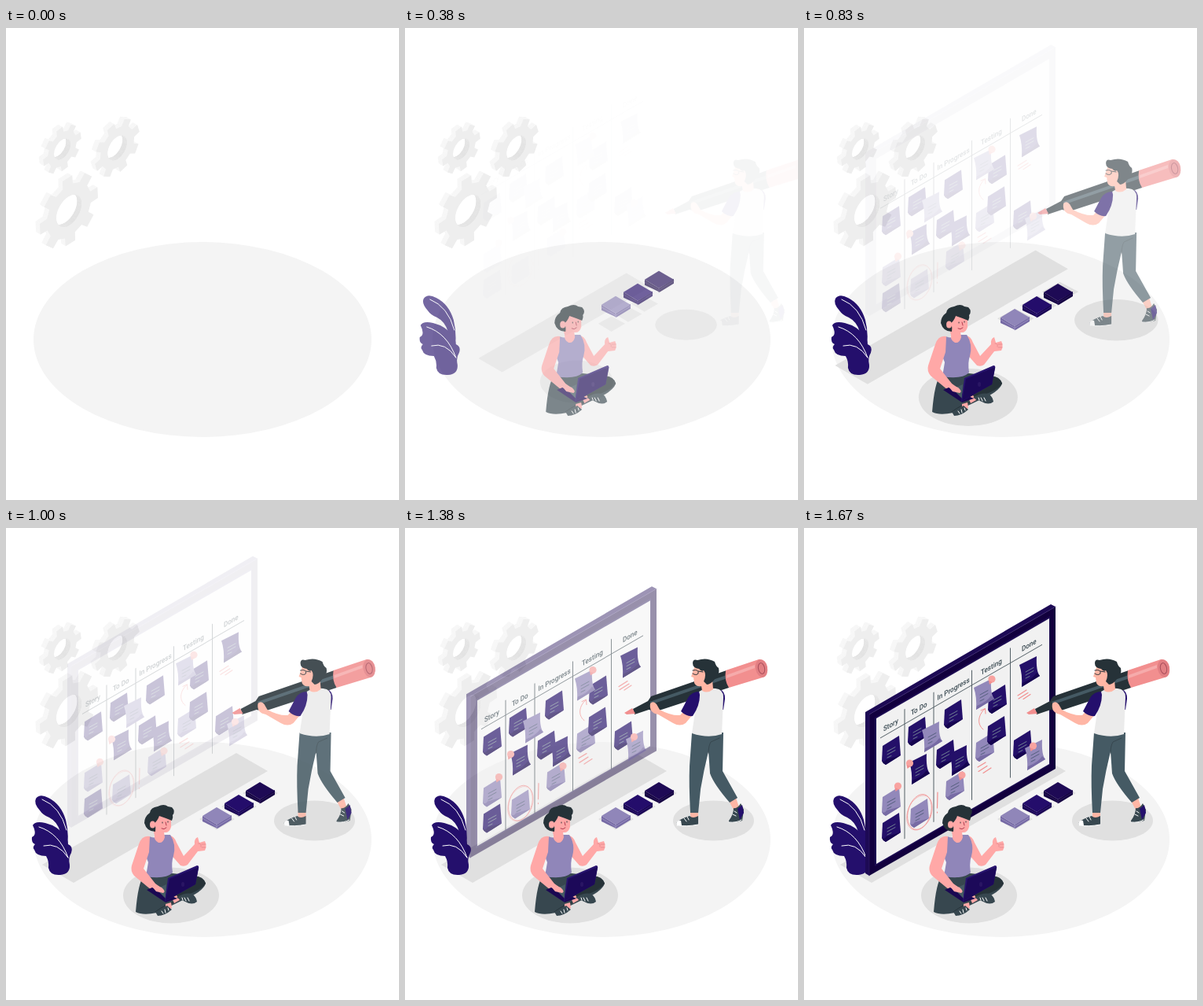
These frames come from a looping animation (500 by 600 pixels, 1710 ms). An HTML page:

```html
<!DOCTYPE html>
<html lang="en">
<head>
<meta charset="utf-8">
<title>Planning board</title>
<style>
html, body { margin: 0; height: 100%; overflow: hidden; background: #fff }
svg { display: block; width: 100vw; height: 100vh }
text { font: 500 9.3px Roboto, sans-serif; fill: #37474f }
.line { fill: none; stroke-linecap: round; stroke-linejoin: round }
</style>
</head>
<body>
<svg viewBox="0 0 500 600">
  <ellipse cx="250" cy="396" rx="215" ry="124" fill="#f4f4f4"/>
  <g id="gears"></g>

  <g id="shadows" fill="#e0e0e0">
    <path d="M293 286L333 309L86 451L46 428Z"/>
    <ellipse cx="210" cy="467" rx="61" ry="35.500"/>
    <ellipse cx="392.5" cy="372" rx="51.5" ry="25.5"/>
    <path d="M268 358L291 370L268 383.500L246 370ZM296 342L319 354L296 367.500L274 354ZM323 325L346 337L323 350.500L301 337Z"/>
  </g>

  <g id="plant" fill="#240f6c">
    <path d="M77 415Q81 390 76 371Q70 351 54 343Q43 337 38 344Q35 350 43 359Q47 365 55 368Q65 373 69 386Q72 392 77 415Z"/>
    <path d="M34 378Q37 372 50 375Q66 379 75 391Q79 397 79 402Q86 405 83 413Q79 419 81 428Q82 440 69 441Q56 442 54 432Q55 424 51 417Q38 417 36 409Q33 406 37 402Q32 400 33 393Q40 390 34 378Z"/>
    <path class="line" stroke="#fff" d="M46 345Q69 354 77 384M42 380Q68 388 79 419M48 404Q66 399 79 419"/>
  </g>

  <g id="board">
    <path fill="#1d0a55" d="M78 234L314 97L320 100L83 237V442L78 439Z"/>
    <path fill="#12003e" d="M83 237L320 100V306L83 442Z"/>
    <path fill="#1c0b52" d="M90 241L313 112V301L90 430Z"/>
    <path class="line" stroke="#36236f" stroke-width=".6" d="M83 442V237L320 100"/>
    <path fill="#f1f1f1" d="M92 242L312 115V300L92 427Z"/>
  </g>

  <g id="content">
    <g id="columns" transform="matrix(1 -.577 0 1 0 323)" stroke="#546067">
      <path d="M97 0H303M128 -19V146M165 -19V146M213.500 -19V146M262.500 -19V146"/>
    </g>
    <g id="notes"></g>
    <g class="line" stroke="#f28f8f">
      <path d="M272 213L283 206M273 217L285 209.500M279 217.500L288 211.500M221 304L231 298M222 309.500L233 302.500M228 311.500L238 305" stroke-width="1.200"/>
      <path d="M228 256C220 250 221 238 230 230M225 232L230.500 229.500L231 236"/>
      <path d="M170 336L169.500 356M169.500 361V362" stroke-width="1.200"/>
      <ellipse cx="147" cy="361" rx="14.500" ry="23" transform="rotate(17 147 361)" stroke-width=".8"/>
      <ellipse cx="147" cy="362" rx="15" ry="23" transform="rotate(22 147 362)" stroke-width=".5"/>
    </g>
  </g>

  <g id="boxes"></g>

  <g id="woman">
    <path fill="#37474f" d="M176 441Q168 450 165 488Q174 493 192 489L225 473Q250 463 254 452Q252 443 239 442L212 439Z"/>
    <path fill="#263238" d="M212 471Q246 464 254 452Q251 442 234 442L206 452Z"/>
    <path class="line" stroke="#263238" d="M190 488Q203 478 216 475"/>
    <path fill="#ffa8a7" d="M211 470L217 467L221 473L214 477ZM203 478L210 476L211 483L203 487Z"/>
    <path fill="#37474f" d="M217 470Q227 463 237 465Q242 469 243 475Q237 480 228 475ZM190 488L205 480L211 485Q202 493 193 493Z"/>
    <path class="line" stroke="#fff" d="M225 473L224 470M229 474L227 470M233 474L231 470M198 487L200 490M202 485L203 489M206 483L207 486"/>
    <path fill="#ffa8a7" d="M207 391Q214 391 217 400L226 417L240 402Q239 395 244 393L246 400L253 398Q256 404 253 410L244 411L231 428Q227 431 222 429L207 412Z"/>
    <path class="line" stroke="#e98d92" d="M245 401Q249 401 248 405M249 402H254M249 406H254"/>
    <path fill="#9086b9" d="M182 392Q192 396 202 390L209 390Q217 402 213 417Q210 425 212 438Q203 447 178 443L181 425Q176 415 178 399Z"/>
    <path fill="#ffa8a7" d="M183 392Q173 390 169 402L160 429Q158 436 163 442L186 461L198 465Q204 463 197 457L190 452L175 433L182 412Z"/>
    <path fill="#ffa8a7" d="M190 365Q202 360 210 367L210 380Q208 388 201 387L202 393Q200 401 194 400Q188 397 189 391L187 382Q182 381 184 375Z"/>
    <path fill="#263238" d="M190 386Q191 378 188 376Q193 372 195 366Q204 369 211 372Q213 368 212 365Q216 360 211 355L206 354Q201 350 193 354Q184 355 183 362Q176 367 176 375Q179 386 190 386Z"/>
    <ellipse cx="186.500" cy="377" rx="3.500" ry="4.500" fill="#ffa8a7"/>
    <path class="line" stroke="#263238" d="M199 374V375M206 373V374"/>
    <path class="line" stroke="#b23c50" d="M198 382Q201 384 204 381M203 374L204 378"/>
    <path fill="#1a0752" d="M179 460L186 457L218 471L203 476Z"/>
    <path fill="#455a64" d="M191 459L204 453L203 471Z"/>
    <path fill="#28146f" d="M206 445L243 429Q246 429 245 433L241 453L202 475Z"/>
    <path fill="#1c0959" d="M208 446L245 431L241 453L203 474Z"/>
    <ellipse cx="225" cy="453" rx="2" ry="3" fill="#2a1664"/>
    <path fill="#ffa8a7" d="M181 450L198 457Q204 462 200 464L191 462Z"/>
  </g>

  <g id="man">
    <path fill="#ffb6a5" d="M367 359H377V371H367ZM416 347L425 343L429 355L422 358Z"/>
    <path fill="#37474f" d="M349 375Q353 370 366 366Q370 370 377 366L377 377Q365 380 350 378ZM416 372Q422 364 422 356Q427 357 431 350L435 358L433 372Q424 375 416 374Z"/>
    <path fill="#240f6c" d="M427 357L433 352L435 362L430 371Z"/>
    <path class="line" stroke="#fff" d="M350 378Q362 380 377 377M359 369L362 373M363 367L365 371M416 374Q426 375 432 371M421 364L425 366M423 360L426 362"/>
    <path fill="#fff" d="M349 376Q350 371 355 372L356 378H350Z"/>
    <path fill="#455a64" d="M369 260H409L408 309L427 343L417 349Q397 326 392 312L390 284Q384 308 380 332L377 362H367Q365 326 366 302Z"/>
    <path class="line" stroke="#37474f" d="M390 286Q390 277 393 272L404 267"/>
    <path fill="#240f6c" d="M404 205Q411 207 411 217L409 231H404Z"/>
    <path fill="#263238" d="M294 230L313 220L317 214L413 181L416 203L324 233L314 231L296 237Z"/>
    <path fill="#455a64" d="M315 221L413 187L414 191L318 224Z"/>
    <path fill="#f28f8f" d="M283 235L293 229L297 236L286 237ZM412 181L454 167Q463 166 465 177Q466 187 459 190L416 203Q410 194 412 181Z"/>
    <path fill="#f6abab" d="M413 187L449 174V178L413 191Z"/>
    <ellipse cx="457.500" cy="178.500" rx="7.500" ry="11.500" fill="#e27f83" transform="rotate(-12 457.500 178.500)"/>
    <ellipse cx="457.500" cy="178.500" rx="4" ry="7" fill="none" stroke="#a94f5c" transform="rotate(-12 457.500 178.500)"/>
    <path fill="#ebebeb" d="M378 208Q386 203 399 204Q409 205 409 215L407 262Q390 268 369 261L373 234Z"/>
    <path fill="#ffb6a5" d="M372 177L383 176L394 182L396 205Q389 211 382 207L381 201Q374 202 372 197L371 190L368 189Z"/>
    <path fill="#263238" d="M370 172Q370 166 376 168Q388 164 398 170Q399 175 403 178Q405 186 398 192Q393 199 388 199L384 195Q388 186 384 181Q381 183 378 179Q370 178 370 172Z"/>
    <ellipse cx="381.500" cy="187" rx="3.500" ry="4.500" fill="#ffb6a5"/>
    <path class="line" stroke="#263238" d="M383 183L377 182M370 181Q378 179 377 185Q374 188 370 185"/>
    <path fill="#ffb6a5" d="M316 223Q320 219 324 224L328 231Q343 239 354 238L362 229L371 236L361 248Q354 253 345 248L326 237Q314 235 316 223Z"/>
    <path fill="#240f6c" d="M378 208Q369 208 364 216L355 233Q362 240 370 239Q379 226 379 212Z"/>
  </g>
</svg>
<script>
const LOOP = 1710, STEP = 1000 / 24, START_HOLD = 130;
const $ = id => document.getElementById(id);
const put = (id, markup) => $(id).insertAdjacentHTML('beforeend', markup);
const path = (d, fill, extra = '') => `<path d="${d}" fill="${fill}" ${extra}/>`;

// Gears: upright isometric discs, extruded towards the upper left
function gear(cx, cy, radius, phase) {
  const at = (r, deg) => {
    const a = deg * Math.PI / 180;
    return (r * Math.cos(a)).toFixed(1) + ' ' + (r * Math.sin(a)).toFixed(1);
  };
  const ring = r => `M${-r} 0A${r} ${r} 0 1 0 ${r} 0A${r} ${r} 0 1 0 ${-r} 0Z`;
  const root = radius * .76, hole = radius * .43;
  const outline = [];
  for (let i = 0; i < 8; i++) {
    const a = phase + i * 45;
    outline.push(at(root, a - 13), at(radius, a - 9.5), at(radius, a + 9.5), at(root, a + 13));
  }
  const body = `M${outline.join('L')}Z` + ring(hole);
  const layer = (k, d, fill) =>
    path(d, fill, `fill-rule="evenodd" transform="matrix(.866 -.5 0 1 ${cx + k} ${cy + k * .577})"`);
  let out = '';
  for (let k = -3; k < 2.5; k += .5) {
    out += layer(k, body, '#f7f7f7') + layer(k, ring(hole) + ring(hole + 2), '#dedede');
  }
  return out + layer(2.5, body, '#eeeeee');
}
put('gears', gear(69, 152.5, 28, -8) + gear(139, 151, 33, -17) + gear(77.5, 231, 43, -3));

[['Story', 101], ['To Do', 136], ['In Progress', 169.5], ['Testing', 225], ['Done', 277]].forEach(([label, x]) =>
  put('columns', `<text stroke="none" transform="translate(${x} -6) scale(.866 1)">${label}</text>`));

// Notes: x, y, dark, curl on the right
const DARK = ['#241069', '#160550', '#6f7f92'], LIGHT = ['#9288ba', '#776ba4', '#56607f'];
function note([x, y, dark, right]) {
  const [face, fold, ink] = dark ? DARK : LIGHT;
  const shape = right
    ? path('M-13 -8L9 -19Q8 0 13 6L-10 20Q-9 3 -13 -8Z', face) + path('M13 6L-10 20L-9 15Q4 10 9 2Z', fold)
    : path('M-11 -6L10 -19L12 6L-7 18Q-11 16 -12 13Z', face) + path('M12 6L-7 18Q-11 16 -12 13Q-8 15 -6 11Z', fold);
  return `<g transform="translate(${x} ${y})">${shape}
    <path class="line" stroke="${ink}" d="M-5 1L5 -4.500M-5 5L5 -.500M-5 9L0 6.500"/></g>`;
}
const notes = [
  [111, 283, 1, 0], [111, 348, 0, 0], [111, 381, 1, 0], [144, 259, 1, 0], [163, 265, 0, 1], [147, 306, 1, 1],
  [147, 363, 0, 0], [190, 237, 1, 0], [180, 288, 1, 0], [198, 295, 1, 1], [192, 328, 0, 0], [246, 218, 1, 0],
  [229, 211, 0, 1], [230, 279, 0, 0], [245, 258, 1, 0], [287, 182, 1, 1], [278, 276, 1, 0], [294, 288, 0, 1]
];
const pins = [[119.5, 328], [134.5, 299], [201, 314], [239, 192], [291.5, 277]];
put('notes', notes.map(note).join('') + pins.map(([x, y]) =>
  `<circle cx="${x}" cy="${y}" r="4.6" fill="#f8a3a0"/><path fill="#f28f8f" d="M${x - 4} ${y + 2}l1 5l4 -3z"/>`).join(''));

// Stacks of cards
const stack = (x, y, top, side, edge) => `<g transform="translate(${x} ${y})">
  ${path('M-18 -2L0 9L19 -3V3L1 14L-18 5Z', side)}${path('M-18 -2L0 -13L19 -2L0 9Z', top)}
  <path class="line" stroke="${edge}" stroke-width=".7" d="M-18 1L0 11.500L19 0M0 9V14"/></g>`;
put('boxes', stack(268, 368, '#9086b9', '#766aa5', '#a49bc8')
  + stack(296, 352, '#240d6b', '#1a0654', '#3b2880')
  + stack(323, 336, '#1e0a55', '#150442', '#372568'));

// Ease with a soft overshoot: cubic-bezier(.36, -.01, .5, 1.38)
function ease(x) {
  if (x >= 1) return 1;
  const curve = (s, a, b) => 3 * (1 - s) * s * ((1 - s) * a + s * b) + s ** 3;
  let lo = 0, hi = 1;
  for (let i = 0; i < 24; i++) {
    const mid = (lo + hi) / 2;
    if (curve(mid, .36, .5) < x) lo = mid; else hi = mid;
  }
  return curve(lo, -.01, 1.38);
}

const boardKeys = [[0, 0], [130, .01], [380, .083], [580, .2], [830, .367], [1130, .583], [1380, .815], [1667, 1], [1800, 1]];
function boardProgress(t) {
  const i = boardKeys.findIndex(key => key[0] > t);
  const [t0, p0] = boardKeys[i - 1], [t1, p1] = boardKeys[i];
  return p0 + (p1 - p0) * (t - t0) / (t1 - t0);
}

function pose(id, opacity, transform) {
  $(id).setAttribute('opacity', Math.max(0, Math.min(1, opacity)));
  $(id).setAttribute('transform', transform);
}

function render(ms) {
  const t = Math.floor((ms + 4) / STEP) * STEP;
  const shown = ms >= START_HOLD ? 1 : 0;
  const quick = ease((t + 20) / 1000), slow = ease((t + 20) / 1670), board = boardProgress(t);
  const away = 30 * (1 - quick), scale = .5 + quick / 2, fade = shown * quick * 1.2;
  pose('shadows', shown * quick, `translate(245 394) scale(${scale}) translate(-245 -394)`);
  pose('plant', fade, `translate(${-away} 0)`);
  pose('woman', fade, `translate(${away} 0)`);
  pose('boxes', fade, `translate(0 ${-away})`);
  pose('man', shown * slow ** 2, `translate(${60 * (1 - slow)} 0)`);
  pose('content', shown * board ** 2, `translate(0 ${-60 * (1 - board)})`);
  pose('board', shown * board ** 4, `translate(0 ${-120 * (1 - board)})`);
}

const begin = performance.now();
function tick() {
  render((performance.now() - begin) % LOOP);
  requestAnimationFrame(tick);
}
tick();
</script>
</body>
</html>
```
